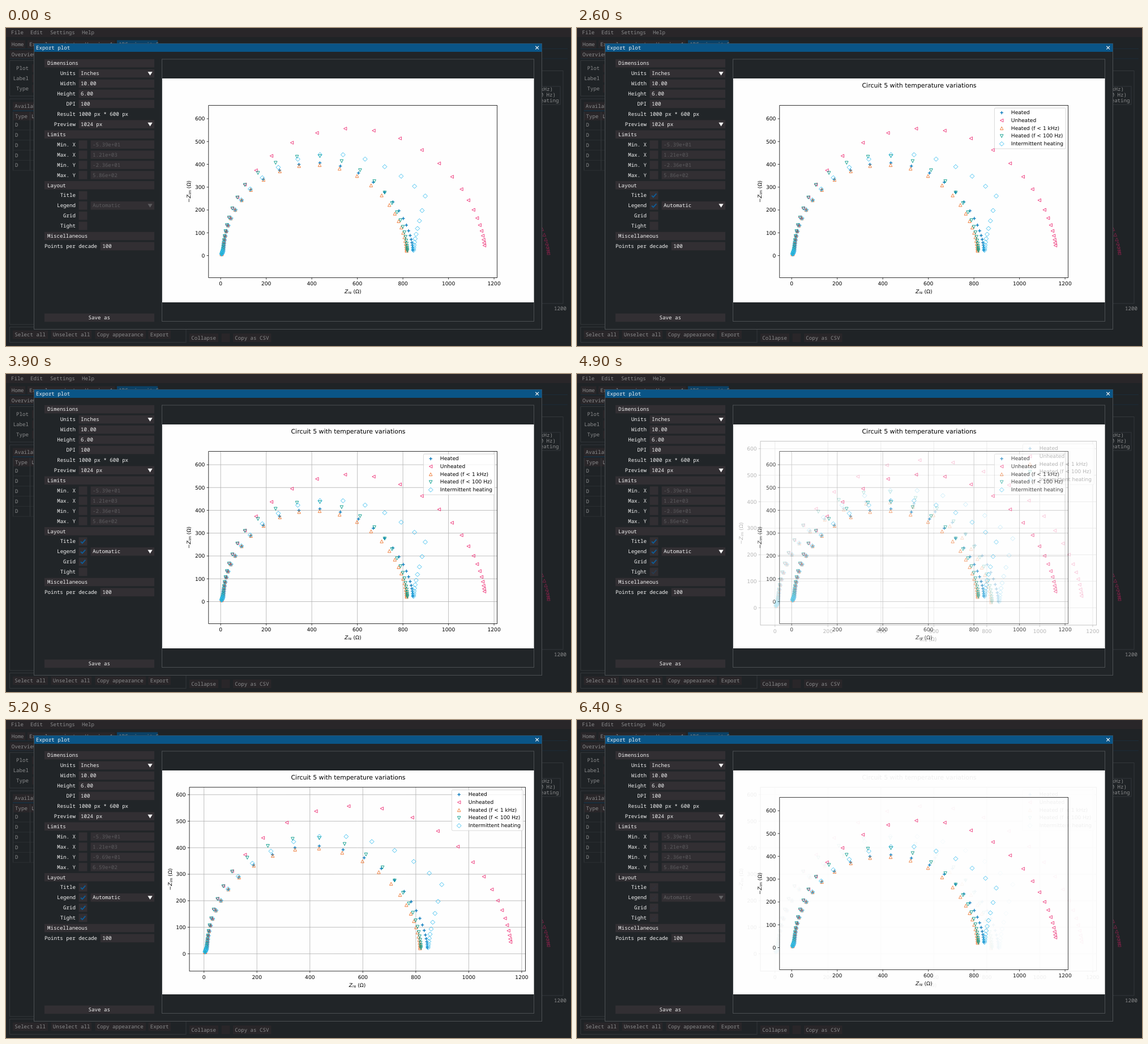
An HTML page with a canvas for the animation above (6.5 s loop, 998 by 561 pixels).

```html
<!DOCTYPE html>
<html>
<head>
<meta charset="utf-8">
<title>Export plot</title>
<style>
html, body { margin: 0; width: 100%; height: 100%; overflow: hidden; background: #202427; }
canvas { display: block; }
</style>
</head>
<body>
<canvas id="stage" width="998" height="561"></canvas>
<script>
const W = 998, H = 561;
const MONO = '9.13px "Noto Sans Mono", monospace';
const sans = (size, style = '') => `${style} ${size}px "DejaVu Sans", sans-serif`;
const PANEL = '#212528', FRAME = '#322f33', BORDER = '#4c5053', WHITE = '#f4f4f4', FAINT = '#5c5b5e';
const DIM = '#8b8c8d', DIM_FRAME = '#292629', DIM_LINE = '#33373a', DIM_BLUE = '#1b2d39';
let g;

// Drawing helpers
function box(x1, y1, x2, y2, fill, stroke, width = 1) {
  if (fill) { g.fillStyle = fill; g.fillRect(x1, y1, x2 - x1, y2 - y1); }
  if (stroke) { g.strokeStyle = stroke; g.lineWidth = width; g.strokeRect(x1, y1, x2 - x1, y2 - y1); }
}
function path(points, color, width, closed) {
  g.beginPath();
  for (const [x, y] of points) g.lineTo(x, y);
  if (closed) g.closePath();
  g.strokeStyle = color;
  g.lineWidth = width;
  g.stroke();
}
function text(s, x, y, color = WHITE, align = 'left', font = MONO) {
  g.font = font;
  g.fillStyle = color;
  g.textAlign = align;
  g.fillText(s, x, y + 3.2);
}

// Impedance of three RC arcs in series at n tenths of a decade above the lowest
// frequency; the resistance of the main arc drifts with the heating.
function spectrum(resistance, slow) {
  return Array.from({ length: 41 }, (_, n) => {
    const r = resistance(n);
    const u = r * 0.00118 * 10 ** ((n - 16) / 10);
    const arcs = [[r, u], [slow, 5 * u], [8, u / 100]];
    return arcs.reduce(([re, im], [R, v]) => [re + R / (1 + v * v), im + R * v / (1 + v * v)], [3, 0]);
  });
}
const COLD = 1092, HOT = 800, HOTTEST = 784;
const heatedBelow = start => n => HOTTEST + (COLD - HOTTEST) * 0.71 ** Math.max(0, start - n);
const intermittent = n => HOT + (n < 10 ? 144 * 0.66 ** (10 - n) : Math.max(0, 12 * (22 - n)));
const series = [
  { name: 'Heated', color: '#0077bb', shape: 'plus', points: spectrum(() => HOT, 34) },
  { name: 'Unheated', color: '#ee3377', shape: 'left', points: spectrum(() => COLD, 57) },
  { name: 'Heated (f < 1 kHz)', color: '#ee7733', shape: 'up', points: spectrum(heatedBelow(30), 22) },
  { name: 'Heated (f < 100 Hz)', color: '#009988', shape: 'down', points: spectrum(heatedBelow(20), 25) },
  { name: 'Intermittent heating', color: '#33bbee', shape: 'diamond', points: spectrum(intermittent, 34) }
];

function marker(shape, x, y, color) {
  const r = 2.74, d = 3.87;
  const at = list => list.map(([u, v]) => [x + u, y + v]);
  if (shape === 'plus') {
    path(at([[-r, 0], [r, 0]]), color, 1.3);
    path(at([[0, -r], [0, r]]), color, 1.3);
    return;
  }
  const outline = {
    left: [[-r, 0], [r, -r], [r, r]],
    up: [[0, -r], [r, r], [-r, r]],
    down: [[0, r], [r, -r], [-r, -r]],
    diamond: [[0, -d], [d, 0], [0, d], [-d, 0]]
  }[shape];
  path(at(outline), color, 0.92, true);
}

function axisLabel(sign, sub, x, y, angle) {
  const parts = [
    [sign, sans(9.12), 0], ['Z', sans(9.12, 'oblique'), 0],
    [sub, sans(6.4), 1.4], [' (Ω)', sans(9.12), 0]
  ].map(([s, font, drop]) => {
    g.font = font;
    return { s, font, drop, width: g.measureText(s).width };
  });
  g.save();
  g.translate(x, y);
  g.rotate(angle);
  let left = -parts.reduce((sum, p) => sum + p.width, 0) / 2;
  for (const p of parts) {
    text(p.s, left, p.drop, '#000', 'left', p.font);
    left += p.width;
  }
  g.restore();
}

const loose = { left: 357.8, right: 867.6, top: 136.6, bottom: 440.4, x0: 379.2, y0: 401.5, scale: 0.4024,
  xLabel: [612.7, 464.8], yLabel: [322.8, 288.5] };
const tight = { left: 324, right: 917.6, top: 118.7, bottom: 443, x0: 349.7, y0: 412.4, scale: 0.4677,
  xLabel: [620.5, 467.8], yLabel: [289.3, 281] };

function drawPlot(stage) {
  const a = stage > 3 ? tight : loose;
  const px = v => a.x0 + v * a.scale, py = v => a.y0 - v * a.scale;
  const ticks = step => Array.from({ length: 7 }, (_, i) => i * step);
  const xs = ticks(200), ys = ticks(100);
  box(276, 89, 932.5, 484, '#fefefe');
  if (stage > 0) text('Circuit 5 with temperature variations', 604.5, 101.3, '#000', 'center', sans(10.94));
  if (stage > 2) {
    for (const v of xs) path([[px(v), a.top], [px(v), a.bottom]], '#b0b0b0', 0.8);
    for (const v of ys) path([[a.left, py(v)], [a.right, py(v)]], '#b0b0b0', 0.8);
  }
  for (const s of series) for (const [x, y] of s.points) marker(s.shape, px(x), py(y), s.color);
  for (const v of xs) {
    path([[px(v), a.bottom], [px(v), a.bottom + 3.2]], '#000', 0.75);
    text(v, px(v), a.bottom + 10.4, '#000', 'center', sans(9.12));
  }
  for (const v of ys) {
    path([[a.left - 3.2, py(v)], [a.left, py(v)]], '#000', 0.75);
    text(v, a.left - 6.4, py(v) + 0.2, '#000', 'right', sans(9.12));
  }
  box(a.left, a.top, a.right, a.bottom, null, '#000', 0.8);
  axisLabel('', 're', ...a.xLabel, 0);
  axisLabel('−', 'im', ...a.yLabel, -Math.PI / 2);
  if (stage > 1) drawLegend(a.right - 130.2, a.top + 4.6);
}

function drawLegend(x, y) {
  g.beginPath();
  g.roundRect(x, y, 126, 71.8, 2);
  g.fillStyle = 'rgba(255,255,255,.8)';
  g.fill();
  g.strokeStyle = 'rgba(204,204,204,.8)';
  g.lineWidth = 0.92;
  g.stroke();
  series.forEach((s, i) => {
    const cy = y + 7.7 + i * 13.75;
    marker(s.shape, x + 12.8, cy + 0.5, s.color);
    text(s.name, x + 29.4, cy, '#000', 'left', sans(9.12));
  });
}

// Dimmed window behind the dialog
function drawBackdrop() {
  const label = (s, x, y, align) => text(s, x, y, DIM, align);
  const button = (s, x1, x2, y) => {
    box(x1, y - 7.5, x2, y + 7.5, DIM_FRAME);
    label(s, x1 + 3.2, y);
  };
  box(0, 0, W, H, '#1f2326');
  box(0, 0, W, 16, DIM_FRAME);
  label('File', 9, 8);
  label('Edit', 43, 8);
  label('Settings', 78, 8);
  label('Help', 134, 8);
  button('Home', 6.5, 34, 29);
  button('Example project - Version 1', 38, 192, 29);
  box(196, 21.5, 268, 36.5, '#0b4166');
  label('ABC circuit 5', 199, 29);
  path([[6, 36.5], [992, 36.5]], DIM_BLUE, 1);
  button('Overview', 6.5, 56, 47);
  path([[6, 54], [992, 54]], DIM_BLUE, 1);

  box(6.5, 57.5, 318, 120, null, DIM_LINE);
  ['Plot', 'Label', 'Type'].forEach((s, i) => {
    label(s, 40, 71 + i * 18, 'right');
    box(46, 64 + i * 18, 60, 78 + i * 18, DIM_FRAME);
  });
  box(6.5, 125, 318, 523, null, DIM_LINE);
  button('Available', 12, 70, 138);
  path([[12, 146], [60, 146]], '#123a54', 1);
  box(12, 148, 60, 163, DIM_FRAME);
  label('Type', 16, 155.5);
  label('Label', 45, 155.5);
  for (let y = 171; y < 250; y += 17.8) {
    label('D', 16, y);
    path([[12, y + 9], [60, y + 9]], '#2b2f32', 1);
  }
  for (const x of [12.5, 42.5]) path([[x, 148], [x, 251]], DIM_LINE, 1);

  box(6.5, 527.5, 318, 554.5, null, DIM_LINE);
  button('Select all', 12, 74, 541);
  button('Unselect all', 79.5, 151, 541);
  button('Copy appearance', 157.5, 247, 541);
  button('Export', 251.5, 291, 541);
  button('Collapse', 324, 375, 546.5);
  button('', 380.5, 395.5, 546.5);
  button('Copy as CSV', 401, 468.5, 546.5);

  box(900, 75.5, 984, 486, null, DIM_LINE);
  box(900, 103, 979, 135, null, DIM_LINE);
  label('(f < 1 kHz)', 966, 107.5, 'right');
  label('(f < 100 Hz)', 971, 118, 'right');
  label('Intermittent heating', 976.5, 128, 'right');
  label('1200', 990, 494.5, 'right');
  for (const [x, y] of series[1].points.slice(0, 9)) marker('up', 683 + x * 0.238, 409 - y * 0.27, '#7c2145');
}

function drawForm(stage) {
  const rowY = i => 62.2 + i * 17.93;
  const frame = (x, y) => box(x, y - 7.3, 262, y + 7.3, FRAME);
  const label = (row, s) => text(s, 123, rowY(row), WHITE, 'right');
  const header = (row, s) => {
    frame(68, rowY(row));
    text(s, 73, rowY(row));
  };
  const field = (x, row, s, color = WHITE) => {
    frame(x, rowY(row));
    text(s, x + 3.5, rowY(row), color);
  };
  const combo = (x, row, s, color = WHITE) => {
    const y = rowY(row);
    field(x, row, s, color);
    g.beginPath();
    g.moveTo(250.3, y - 3);
    g.lineTo(258.7, y - 3);
    g.lineTo(254.5, y + 3.6);
    g.fill();
  };
  const check = (row, on) => {
    const y = rowY(row);
    box(128.5, y - 7.3, 143.5, y + 7.3, FRAME);
    if (on) path([[132, y + 0.3], [134.8, y + 3], [140.3, y - 3.2]], '#0f5c97', 1.9);
  };

  header(0, 'Dimensions');
  ['Units', 'Width', 'Height', 'DPI', 'Result', 'Preview'].forEach((s, i) => label(i + 1, s));
  combo(128.5, 1, 'Inches');
  ['10.00', '6.00', '100'].forEach((s, i) => field(128.5, i + 2, s));
  text('1000 px * 600 px', 128.5, rowY(5));
  combo(128.5, 6, '1024 px');

  header(7, 'Limits');
  const yLimits = stage > 3 ? ['-9.69e+01', '6.59e+02'] : ['-2.36e+01', '5.86e+02'];
  const limits = ['-5.39e+01', '1.21e+03', ...yLimits];
  ['Min. X', 'Max. X', 'Min. Y', 'Max. Y'].forEach((s, i) => {
    label(i + 8, s);
    check(i + 8, false);
    field(149.5, i + 8, limits[i], FAINT);
  });

  header(12, 'Layout');
  ['Title', 'Legend', 'Grid', 'Tight'].forEach((s, i) => {
    label(i + 13, s);
    check(i + 13, stage > i);
  });
  combo(149.5, 14, 'Automatic', stage > 1 ? WHITE : FAINT);

  header(17, 'Miscellaneous');
  text('Points per decade', 68, rowY(18));
  field(166.7, 18, '100');
  frame(68, 511);
  text('Save as', 164.7, 511, WHITE, 'center');
}

function drawSlide(stage) {
  const canvas = document.createElement('canvas');
  canvas.width = W;
  canvas.height = H;
  g = canvas.getContext('2d');
  g.textRendering = 'geometricPrecision';
  drawBackdrop();
  box(49.5, 27.5, 946.5, 531.5, PANEL, BORDER);
  box(50, 27.5, 946.5, 42, '#0a5587');
  text('Export plot', 53, 35);
  path([[935.3, 32], [941, 37.7]], WHITE, 1.1);
  path([[941, 32], [935.3, 37.7]], WHITE, 1.1);
  drawForm(stage);
  box(275.5, 55, 932.5, 517.5, null, BORDER);
  drawPlot(stage);
  return canvas;
}

const slides = [0, 1, 2, 3, 4].map(drawSlide);
const screen = document.getElementById('stage').getContext('2d');

// Each slide holds for 1 s, then fades in 100 ms steps
function frame() {
  const t = performance.now() % 6500;
  const index = Math.floor(t / 1300);
  const step = Math.floor((t % 1300 - 1000) / 100);
  screen.globalAlpha = 1;
  screen.drawImage(slides[index], 0, 0);
  if (step >= 0) {
    screen.globalAlpha = 0.28 + step / 3;
    screen.drawImage(slides[(index + 1) % 5], 0, 0);
  }
  requestAnimationFrame(frame);
}
frame();
</script>
</body>
</html>
```
